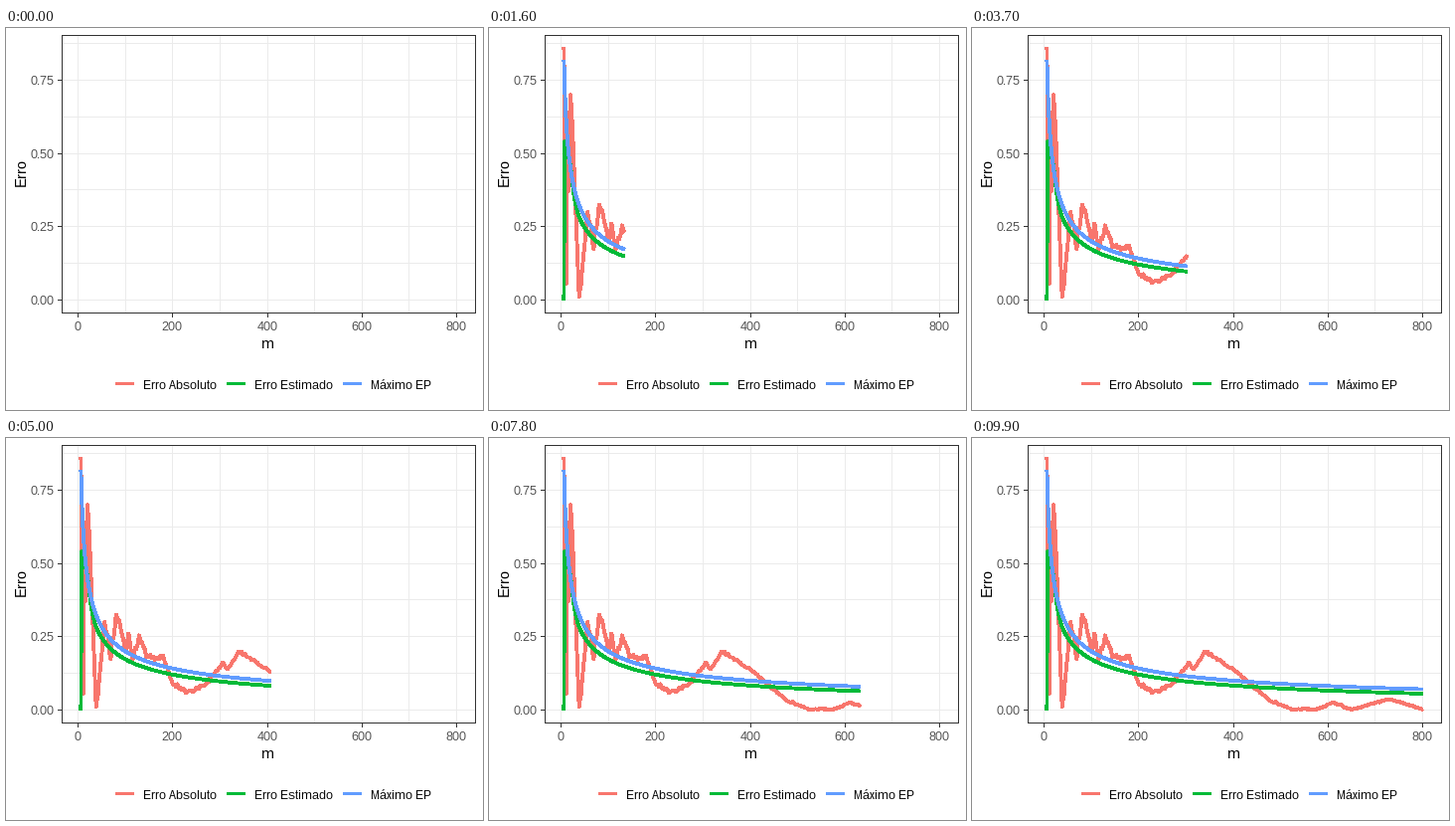
A matplotlib script for the animation above (10000 ms loop, 480x384 px).

```python
import numpy as np
import matplotlib.pyplot as plt
from matplotlib.animation import FuncAnimation

W, H, DPI = 480, 384, 96
FRAMES, INTERVAL = 100, 100
M0, M1 = 6, 800
RED, GREEN, BLUE = "#F8766D", "#00BA38", "#619CFF"
GRID, DARK, LABEL = "#EBEBEB", "#333333", "#4D4D4D"
PX = 72 / DPI  # one pixel in points
THICK = 2.845
L, R, T, B = 56.5, 472.5, 7.5, 286.5  # panel edges

plt.rcParams.update({
    "font.family": "Liberation Sans",
    "text.hinting": "native",
    "text.hinting_factor": 1,
    "path.simplify": False,
    "path.snap": False,
})


def px(m):
    return 72.55 + 0.4763 * np.asarray(m, float)


def py(v):
    return 273.4 - 294.7 * np.asarray(v, float)


def cell(p):
    """Centre of the pixel that holds p."""
    return np.floor(p) + 0.5


m = np.arange(M0, M1 + 1)

# Absolute error: main turning points, plus sampling noise that fades as 1/m
turns = np.array([
    (6, .86), (11, .055), (13, .64), (15, .37), (20, .70), (24, .59),
    (38, .01), (56, .28), (69, .19), (80, .33), (101, .21), (106, .265),
    (115, .18), (129, .245), (147, .18), (179, .18), (200, .092),
    (232, .058), (268, .085), (305, .16), (316, .138), (341, .20),
    (400, .138), (474, .035), (525, .001), (575, .003), (612, .025),
    (650, .001), (730, .038), (800, .003),
])
rng = np.random.default_rng(7)
grid = np.arange(M0, M1 + 3, 3)
wobble = np.interp(m, grid, rng.uniform(-1, 1, grid.size))
wobble *= np.where((m > 40) & (m < M1), 1.6 / m, 0)
absolute = np.abs(np.interp(m, *turns.T) + wobble)

# Standard errors fall as 1/sqrt(m)
maximum = 2 / np.sqrt(m)
bump = 0.28 * np.exp(-(np.log(m / 20) / 0.35) ** 2)
estimate = np.minimum(0.54, (1.75 - 0.17 * m / M1 + bump) / np.sqrt(m))
estimate[0] = 0

fig = plt.figure(figsize=(W / DPI, H / DPI), dpi=DPI, facecolor="white")
ax = fig.add_axes([0, 0, 1, 1])
ax.set(xlim=(0, W), ylim=(H, 0))
ax.axis("off")


def segment(xs, ys, color, width=1.0, z=1):
    return ax.plot(xs, ys, color=color, lw=width * PX, antialiased=False,
                   snap=False, solid_capstyle="butt",
                   solid_joinstyle="round", zorder=z)[0]


def text(x, y, s, size, color="black", ha="center", **kw):
    ax.text(x, y, s, fontsize=size * PX, color=color, ha=ha, va="baseline", **kw)


for k in range(9):
    x = cell(px(100 * k))
    segment([x, x], [T, B], GRID)
    if k % 2 == 0:
        segment([x, x], [B, B + 4], DARK)
        text(x - 0.5, 304, str(100 * k), 12, LABEL)

for k in range(8):
    y = cell(py(k / 8))
    segment([L, R], [y, y], GRID)
    if k % 2 == 0:
        segment([L - 4, L], [y, y], DARK)
        text(49, y + 4.5, f"{k / 8:.2f}", 12, LABEL, ha="right")

segment([L - 0.5, R + 0.5], [T, T], DARK, z=6)
segment([L - 0.5, R + 0.5], [B, B], DARK, z=6)
segment([L, L], [T, B], DARK, z=6)
segment([R, R], [T, B], DARK, z=6)
text(263, 322, "m", 15)
text(20, 145, "Erro", 15, rotation=90, rotation_mode="anchor")

series = [
    ("Erro Absoluto", RED, absolute, 108),
    ("Erro Estimado", GREEN, estimate, 220),
    ("Máximo EP", BLUE, maximum, 337),
]
lines = []
for z, (name, color, values, x) in enumerate(series, 2):
    segment([x + 2, x + 21], [357.5, 357.5], color, THICK)
    text(x + 30, 363, name, 12, ha="left")
    lines.append((segment([], [], color, THICK, z), values))


def update(i):
    end = M0 + (M1 - M0) * i / (FRAMES - 1)
    shown = m < end
    for line, values in lines:
        if i == 0:
            line.set_data([], [])
            continue
        xs = np.append(m[shown], end)
        ys = np.append(values[shown], np.interp(end, m, values))
        line.set_data(px(xs), py(ys))
    return [line for line, _ in lines]


anim = FuncAnimation(fig, update, frames=FRAMES, interval=INTERVAL,
                     init_func=lambda: update(0), repeat=True,
                     repeat_delay=0, blit=False)
plt.show()
```
